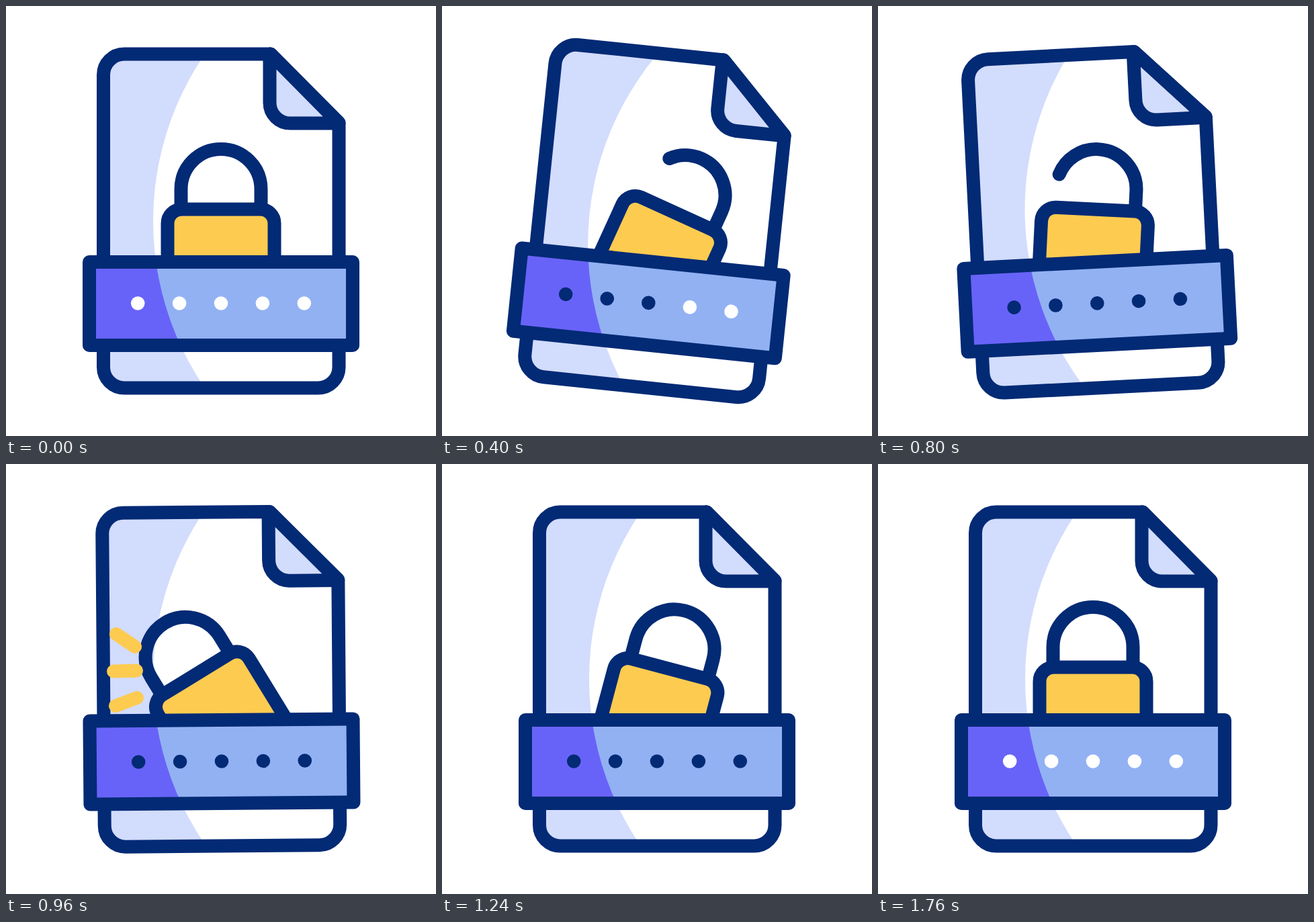
These frames come from a looping animation (640x640 px, 2 s). An HTML page:

```html
<!DOCTYPE html>
<html lang="en">
<head>
<meta charset="utf-8">
<title>Password lock</title>
<style>
  html, body { margin: 0; width: 100%; height: 100%; overflow: hidden; background: #fff; }
  svg { display: block; width: 100%; height: 100%; }
  .line { fill: none; stroke: #032a75; stroke-width: 20; stroke-linecap: round; stroke-linejoin: round; }
  .spark { stroke: #fdcb50; }
</style>
</head>
<body>
<svg viewBox="0 0 640 640">
  <defs>
    <path id="sheet" d="M394 71.5H176a31 31 0 0 0-31 31V537.500a31 31 0 0 0 31 31H464.500a31 31 0 0 0 31-31V173.500Z"/>
    <rect id="strip" x="124" y="381" width="392" height="124"/>
    <clipPath id="inSheet"><use href="#sheet"/></clipPath>
    <clipPath id="inStrip"><use href="#strip"/></clipPath>
  </defs>

  <g class="tilt">
    <use href="#sheet" fill="#d2dcfd"/>
    <circle cx="659" cy="320" r="440" fill="#fff" clip-path="url(#inSheet)"/>
    <path class="line" style="fill:#d2dcfd" d="M392.500 71.500V144a30.500 30.500 0 0 0 30.500 30.500H495.500L394 71.500"/>
    <use href="#sheet" class="line"/>
  </g>

  <g id="lock">
    <path id="shackle" class="line" d="M379.500 302.500V272.500a59.500 59.500 0 0 0-119 0V302.500"/>
    <rect class="line" style="fill:#fdcb50" x="240.500" y="302.500" width="159" height="142" rx="21"/>
  </g>

  <g id="sparks"></g>

  <g class="tilt">
    <use href="#strip" fill="#6863f8"/>
    <circle cx="659" cy="320" r="440" fill="#92b1f3" clip-path="url(#inStrip)"/>
    <use href="#strip" class="line"/>
    <g id="dots"></g>
  </g>
</svg>
<script>
const LOOP = 2000, STEP = 40;
const NAVY = '#032a75';
const $ = id => document.getElementById(id);

// [time, value] keys, eased in and out between neighbours
const TILT = [[0, 0], [355, 6.5], [675, -4], [1050, 0.15], [1160, 0]];
const SWING = [[95, 0], [600, 37.5], [1010, -34.5], [1280, 18], [1540, -10], [1740, 0]];
const OPEN = [[0, 0], [600, 100], [1000, 0]];
const SPARK_HEAD = [[880, 0], [960, 1]];
const SPARK_TAIL = [[970, 0], [1090, 1]];
const DOTS_RESET = 1440;

// Each spark runs from its inner end to its outer end
const SPARKS = [[192, 272, 164, 253], [194, 307.5, 160, 308.5], [195, 348, 163, 360]];

function add(parent, tag, attrs) {
  const el = document.createElementNS('http://www.w3.org/2000/svg', tag);
  for (const name in attrs) el.setAttribute(name, attrs[name]);
  return parent.appendChild(el);
}

function valueAt(keys, t) {
  const next = keys.findIndex(key => key[0] > t);
  if (next === 0) return keys[0][1];
  if (next < 0) return keys[keys.length - 1][1];
  const [t0, a] = keys[next - 1], [t1, b] = keys[next];
  const p = (t - t0) / (t1 - t0);
  return a + (b - a) * p * p * (3 - 2 * p);
}

const tilted = document.querySelectorAll('.tilt');
const shackle = $('shackle');
const shackleLength = shackle.getTotalLength();
const dots = [0, 1, 2, 3, 4].map(i =>
  add($('dots'), 'circle', { cx: 196.2 + i * 61.9, cy: 442.5, r: 10.3 }));
const sparks = SPARKS.map(() => add($('sparks'), 'line', { class: 'line spark' }));

function draw(t) {
  const tilt = valueAt(TILT, t);
  tilted.forEach(el => el.setAttribute('transform', `rotate(${tilt} 320 320)`));

  $('lock').setAttribute('transform', `rotate(${valueAt(SWING, t)} 320 373.5)`);
  shackle.setAttribute('stroke-dasharray', `${shackleLength - valueAt(OPEN, t)} 999`);

  dots.forEach((dot, i) => {
    const typed = t >= 120 * (i + 1) && t < DOTS_RESET;
    dot.setAttribute('fill', typed ? NAVY : '#fff');
  });

  const head = valueAt(SPARK_HEAD, t), tail = valueAt(SPARK_TAIL, t);
  $('sparks').setAttribute('visibility', head > tail ? 'visible' : 'hidden');
  sparks.forEach((spark, i) => {
    const [x0, y0, x1, y1] = SPARKS[i];
    const place = (n, p) => {
      spark.setAttribute('x' + n, x0 + (x1 - x0) * p);
      spark.setAttribute('y' + n, y0 + (y1 - y0) * p);
    };
    place(1, tail);
    place(2, head);
  });
}

const start = performance.now();
function tick() {
  const t = (performance.now() - start) % LOOP;
  draw(t - t % STEP);
  requestAnimationFrame(tick);
}
tick();
</script>
</body>
</html>
```
